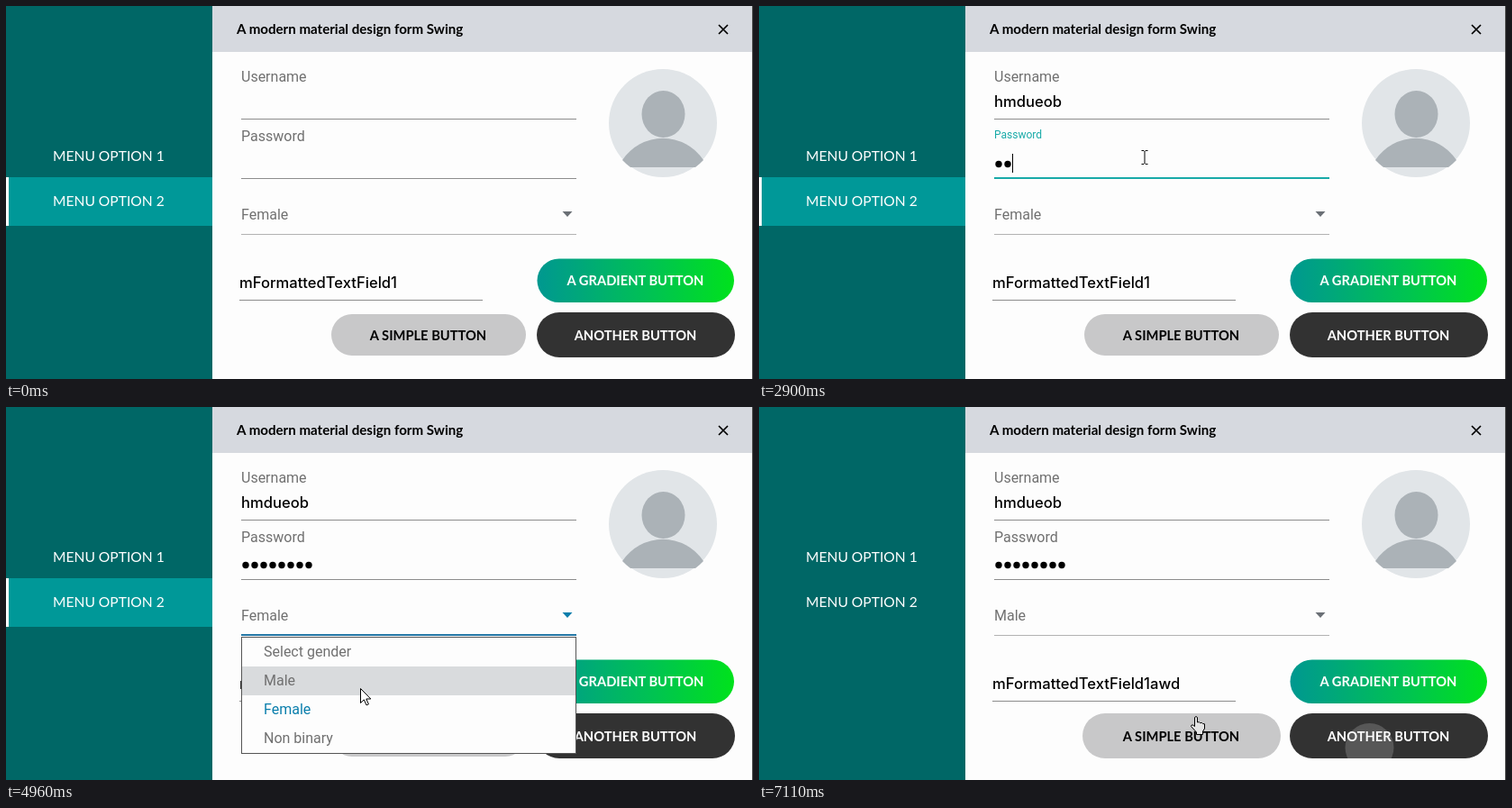
Animation of 829 by 414 pixels, one loop 7.16 s. Source, as an HTML page:

```html
<!DOCTYPE html>
<html lang="en">
<head>
<meta charset="utf-8">
<title>Material form</title>
<style>
  html, body { margin: 0; width: 100%; height: 100%; overflow: hidden; background: #fdfdfd; }
  svg { display: block; width: 100vw; height: 100vh; }
  .label { font: 16px Roboto, sans-serif; fill: #707070; }
  .value { font: 500 16.6px Inter, sans-serif; fill: #000; }
  .menu { font: 15.6px Lato, sans-serif; fill: #fff; }
  .title { font: 700 15.1px Lato, sans-serif; }
  .button { font: 700 14.7px Lato, sans-serif; text-anchor: middle; }
  .light { fill: #fff; }
  .rule { stroke: #8c8c8c; }
  .focus { stroke: #18aaa8; stroke-width: 2; }
  .caret { stroke: #000; shape-rendering: crispEdges; }
  .off { display: none; }
</style>
</head>
<body>
<svg viewBox="0 0 829 414" preserveAspectRatio="none">
  <defs>
    <linearGradient id="sweep">
      <stop offset="0" stop-color="#009890"/>
      <stop offset=".2" stop-color="#00a67c"/>
      <stop offset=".6" stop-color="#00c450"/>
      <stop offset="1" stop-color="#00e21c"/>
    </linearGradient>
    <clipPath id="pill"><rect x="589" y="340" width="220" height="50" rx="25"/></clipPath>
  </defs>

  <rect width="829" height="414" fill="#fdfdfd"/>
  <rect width="229" height="414" fill="#006766"/>
  <g id="selected">
    <rect y="190" width="229" height="54" fill="#009898"/>
    <rect y="190" width="3" height="54" fill="#fff"/>
  </g>
  <text class="menu" x="52" y="172">MENU OPTION 1</text>
  <text class="menu" x="52" y="222">MENU OPTION 2</text>

  <rect x="229" width="600" height="51" fill="#d6d9df"/>
  <text class="title" x="256" y="31">A modern material design form Swing</text>
  <path d="M791 21l10 10m0-10l-10 10" stroke="#000" stroke-width="1.7"/>

  <circle cx="729" cy="130" r="60" fill="#e1e5e8"/>
  <g fill="#abb2b7">
    <ellipse cx="729.5" cy="120" rx="24" ry="26"/>
    <path d="M684 171A54 54 0 0 1 774 171A60 60 0 0 1 765 179H693A60 60 0 0 1 684 171Z"/>
  </g>

  <g id="fields"></g>

  <g id="bullets"></g>

  <text id="choice" class="label" x="261" y="237">Female</text>
  <path id="arrow" d="M617.500 228h11l-5.500 6z"/>
  <path class="rule" d="M261 253.500h372" opacity=".65"/>
  <path id="comboLine" d="M261 253h372" stroke="#2477a5" stroke-width="2"/>

  <rect x="589.500" y="280.500" width="218.500" height="48.500" rx="24.250" fill="url(#sweep)"/>
  <rect id="simple" fill="#c8c8c9"/>
  <text class="button light" x="698.5" y="310">A GRADIENT BUTTON</text>
  <text class="button" x="468.5" y="370.5">A SIMPLE BUTTON</text>
  <rect x="589" y="340" width="220" height="50" rx="25" fill="#323232"/>
  <circle id="ripple" cx="677.500" cy="378" fill="#fff" clip-path="url(#pill)"/>
  <text class="button light" x="698.5" y="370.5">ANOTHER BUTTON</text>

  <g id="popup">
    <rect x="261.500" y="255.500" width="371" height="129" fill="#fdfdfd" stroke="#555"/>
    <rect id="hover" x="262" width="370" height="32" fill="#d9dbdd"/>
  </g>

  <rect x="828" width="1" height="414" fill="#444"/>

  <g id="pointer">
    <path id="ibeam" d="M-3.500 -7.500h2.500l1 1 1-1h2.500M0 -6.500V6.500M-3.500 7.500h2.500l1-1 1 1h2.500" fill="none" stroke="#000"/>
    <path id="cursor" d="M.5 .5v16l3.800-3.600 2.700 6 2.400-1-2.600-5.900h5z" fill="#fff" stroke="#000"/>
    <path id="hand" d="M-2.500 2.500V-7.500q1.500-2 3 0V-2l2-.3 1 1 2-.2 1 1 2 .3V5L6.500 8v3.500h-7V9L-6.500 2.500q0-2 2-1.500z" fill="#e4e4e4" stroke="#000"/>
  </g>
</svg>
<script>
  const LOOP = 7160;
  const $ = id => document.getElementById(id);

  const set = (el, attrs) => {
    for (const key in attrs) el.setAttribute(key, attrs[key]);
  };
  const add = (parent, tag, attrs, text = '') => {
    const el = document.createElementNS('http://www.w3.org/2000/svg', tag);
    set(el, attrs);
    el.textContent = text;
    return parent.appendChild(el);
  };
  const show = (el, on) => el.classList.toggle('off', !on);
  const clamp = v => Math.max(0, Math.min(1, v));
  const ease = v => v * v * (3 - 2 * v);
  const mix = (a, b, k) => a + (b - a) * k;
  const ramp = (t, start, length) => ease(clamp((t - start) / length));
  const within = (t, [start, end]) => t >= start && t < end;
  const typed = (t, [start, end], count) =>
    t < start ? 0 : Math.min(count, 1 + Math.floor((t - start) / (end - start) * (count - 1)));

  // Each field: focus period, typing period and geometry
  const fields = [
    { label: 'Username', text: 'hmdueob', x: 261, y: 125, width: 372, base: 112, hintBase: 114,
      focus: [700, 2420], typing: [1020, 1800] },
    { label: 'Password', text: '', dots: 8, x: 261, y: 191, width: 372, base: 180, hintBase: 180,
      focus: [2420, 4300], typing: [2760, 3650] },
    { label: '', start: 'mFormattedTextField1', text: 'awd', x: 259, y: 326, width: 270, base: 313,
      hintBase: 313, focus: [5560, 6760], typing: [6020, 6380] }
  ];

  for (const f of fields) {
    const g = $('fields');
    f.mid = f.x + f.width / 2;
    f.tag = add(g, 'text', { class: 'label', x: f.x }, f.label);
    f.hint = add(g, 'text', { class: 'label', x: f.x, y: f.hintBase }, f.label);
    f.value = add(g, 'text', { class: 'value', x: f.x, y: f.base });
    add(g, 'path', { class: 'rule', d: `M${f.x} ${f.y + .5}h${f.width}` });
    f.line = add(g, 'path', { class: 'focus' });
    f.caret = add(g, 'path', { class: 'caret' });
  }

  const dots = Array.from({ length: 8 }, (_, i) =>
    add($('bullets'), 'circle', { cx: 266 + 10 * i, cy: 175.5, r: 3.7 }));

  ['Select gender', 'Male', 'Female', 'Non binary'].forEach((name, i) =>
    add($('popup'), 'text', { class: 'label', x: 286, y: 277 + 32 * i,
      style: name === 'Female' ? 'fill:#0a7eac' : '' }, name));

  // Pointer stops: time, x, y
  const path = [
    [250, 370, 70], [640, 406, 112], [2240, 406, 112], [2400, 428, 168], [3760, 428, 168],
    [4020, 448, 220], [4260, 452, 238], [4420, 452, 238], [4620, 420, 334], [4860, 393, 312],
    [5180, 393, 312], [5500, 478, 320], [6400, 478, 320], [6700, 678, 378],
    [6860, 678, 378], [7080, 486, 352]
  ];

  function pointerAt(t) {
    const next = path.findIndex(stop => stop[0] > t);
    if (next < 0) return path[path.length - 1].slice(1);
    if (next === 0) return path[0].slice(1);
    const [a, b] = [path[next - 1], path[next]];
    const k = ramp(t, a[0], b[0] - a[0]);
    return [mix(a[1], b[1], k), mix(a[2], b[2], k)];
  }

  function drawField(f, t) {
    const active = within(t, f.focus);
    const k = ramp(t, f.focus[0], 180) * (1 - ramp(t, f.focus[1], 150));
    const count = typed(t, f.typing, f.dots || f.text.length);
    const colour = `rgb(${mix(112, 24, k)},${mix(112, 170, k)},${mix(112, 168, k)})`;
    set(f.tag, { y: f.y - mix(41, 44, k), style: `font-size:${mix(16, 12, k)}px;fill:${colour}` });
    show(f.hint, active && !count);

    f.value.textContent = (f.start || '') + f.text.slice(0, count);
    if (f.dots) dots.forEach((dot, i) => show(dot, i < count));

    const half = f.width / 2 * k;
    set(f.line, { d: `M${f.mid - half} ${f.y}h${2 * half}` });
    show(f.line, k > 0);

    const width = f.dots ? count * 10 : f.value.getComputedTextLength();
    const x = Math.round(f.x + width) + .5;
    set(f.caret, { d: `M${x} ${f.base - 16}v21` });
    show(f.caret, active);
  }

  function drawPointer(t, x, y) {
    const overField = y > 92 && y < 125 || y > 155 && y < 192
      || y > 295 && y < 330 && x < 530 && t > 5300;
    const overButton = y > 340 && x > 360 && t > 6400;
    const kind = overButton ? 'hand' : overField ? 'ibeam' : 'cursor';
    for (const id of ['hand', 'ibeam', 'cursor']) show($(id), id === kind);
    set($('pointer'), { transform: `translate(${Math.round(x)} ${Math.round(y)})` });
    show($('pointer'), t >= path[0][0]);
  }

  function draw(t) {
    const [x, y] = pointerAt(t);
    fields.forEach(f => drawField(f, t));

    const comboOn = within(t, [4300, 5560]);
    $('choice').textContent = t < 5160 ? 'Female' : 'Male';
    set($('arrow'), { fill: comboOn ? '#0a7eac' : '#6b7076' });
    show($('comboLine'), comboOn);
    show($('popup'), within(t, [4360, 5160]));
    const row = y < 256 ? 2 : Math.min(3, Math.floor((y - 256) / 32));
    set($('hover'), { y: 256 + 32 * row });

    const grow = 2 * ramp(t, 7000, 80);
    set($('simple'), { x: 361 - grow, y: 342 - grow, width: 216 + 2 * grow,
      height: 46 + 2 * grow, rx: 23 + grow });

    show($('selected'), t < 6760);
    const spread = clamp((t - 6800) / 310);
    set($('ripple'), { r: 27 * spread, opacity: .18 });
    show($('ripple'), spread > 0);
    drawPointer(t, x, y);
  }

  const begin = performance.now();
  function tick() {
    draw((performance.now() - begin) % LOOP);
    requestAnimationFrame(tick);
  }
  tick();
</script>
</body>
</html>
```
